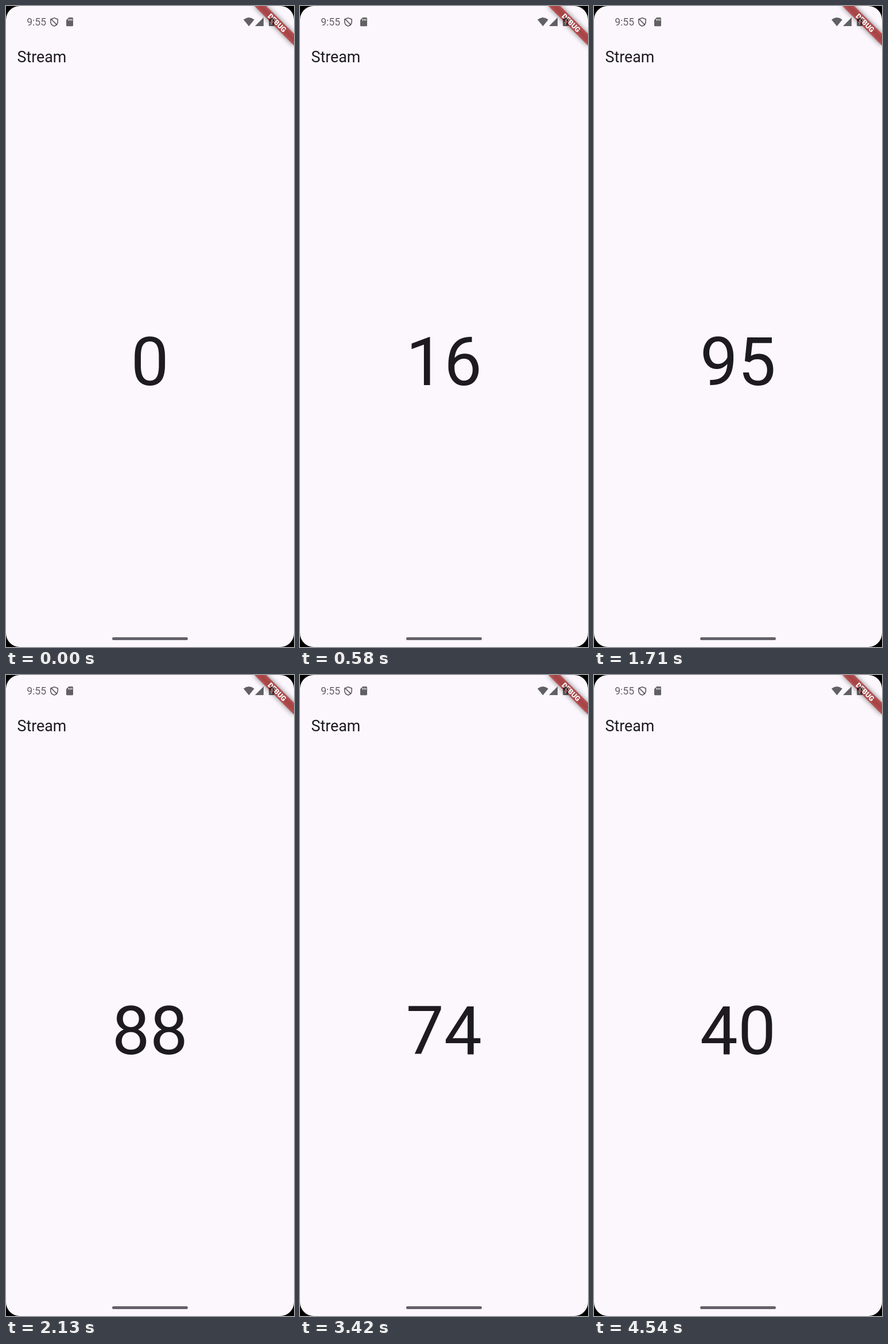
These frames come from a looping animation (502 px wide and 1116 px high, 4.58 s). An HTML page:

```html
<!DOCTYPE html>
<html lang="en">
<head>
<meta charset="utf-8">
<title>Stream</title>
<style>
  html, body { margin: 0; width: 100%; height: 100%; overflow: hidden; background: #000; }
  svg { display: block; width: 502px; height: 1116px; }
  text { font-family: Roboto, "Liberation Sans", sans-serif; fill: #1d1b20; }
</style>
</head>
<body>
<svg viewBox="0 0 502 1116">
  <defs>
    <clipPath id="screen"><rect width="502" height="1116" rx="24"/></clipPath>
    <filter id="blur" x="-50%" y="-200%" width="200%" height="500%">
      <feGaussianBlur stdDeviation="4.6"/>
    </filter>
  </defs>
  <g clip-path="url(#screen)">
    <rect width="502" height="1116" fill="#fcf7fd"/>
    <text x="19.5" y="98" font-size="26.8">Stream</text>
    <text id="value" x="251" y="659.5" font-size="117.5" letter-spacing=".3" text-anchor="middle">0</text>

    <!-- debug ribbon -->
    <g transform="translate(502 0) rotate(45)">
      <rect x="-48.8" y="34.2" width="97.6" height="14.6" fill="#000" opacity=".5" filter="url(#blur)"/>
      <rect x="-48.8" y="34.2" width="97.6" height="14.6" fill="#b71c1c" fill-opacity=".627"/>
      <text y="45.9" font-size="12.4" font-weight="900" text-anchor="middle" style="fill:#fff">DEBUG</text>
    </g>

    <!-- status bar -->
    <g fill="#000" fill-opacity=".61">
      <text x="36.2" y="34" font-size="17.6" style="fill:#000">9:55</text>
      <g fill="none" stroke="#000" stroke-opacity=".61" stroke-width="1.7">
        <path d="M84 20.8 L90.2 23.2 V27.4 C90.2 31 87.6 33.7 84 35 C80.4 33.7 77.8 31 77.8 27.4 V23.2 Z"/>
        <path d="M79.2 23.4 L88.2 32.4"/>
      </g>
      <path fill-rule="evenodd" d="M109.3 20 H115.5 Q117 20 117 21.5 V33.7 Q117 35.2 115.5 35.2 H106.5 Q105 35.2 105 33.7 V24.4 Z
        M108.6 22.6 V25.6 H110 V22.6 Z M111.3 22.6 V25.6 H112.7 V22.6 Z M114 22.6 V25.6 H115.4 V22.6 Z"/>
      <path d="M414 23.7 Q423.4 16.3 432.8 23.7 L423.4 35.2 Z"/>
      <path d="M449 20 V35 H434 Z"/>
      <path fill-rule="evenodd" d="M461 21.5 V20 H465 V21.5 H466.6 Q467.8 21.5 467.8 22.7 V33.8 Q467.8 35 466.6 35 H459.4 Q458.2 35 458.2 33.8 V22.7 Q458.2 21.5 459.4 21.5 Z
        M463.7 23.6 L460.3 29.2 H462.5 V33 L465.8 27.4 H463.7 Z"/>
    </g>

    <rect x="185" y="1099" width="132" height="5" rx="2.5" fill="#65616a"/>
  </g>
</svg>
<script>
  const LOOP = 4580, FIRST = 130, PERIOD = 1000;
  const values = [0, 16, 95, 88, 74, 40];
  const label = document.getElementById('value');

  function render(time) {
    const step = Math.floor((time % LOOP - FIRST) / PERIOD) + 1;
    const next = String(values[Math.max(0, step)]);
    if (label.textContent !== next) label.textContent = next;
  }

  const start = performance.now();
  function tick() {
    render(performance.now() - start);
    requestAnimationFrame(tick);
  }
  tick();
</script>
</body>
</html>
```
